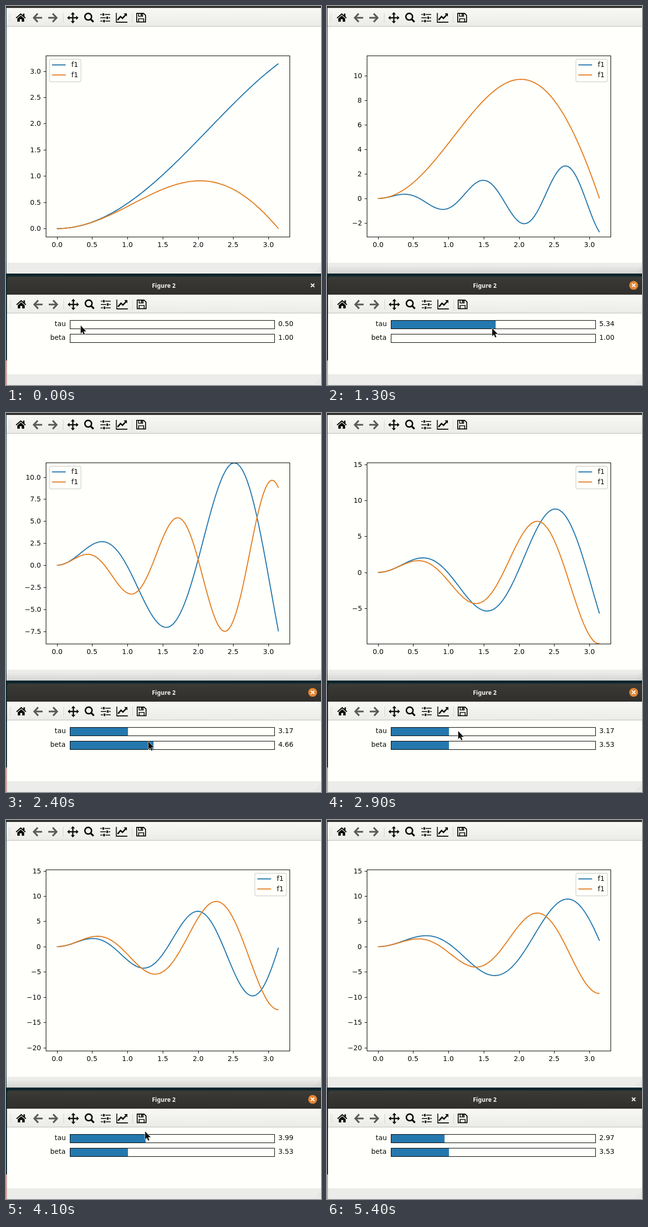
An HTML page with a canvas that plays this animation: 641 by 772 pixels, repeating every 5.6 s.

```html
<!DOCTYPE html>
<html lang="en">
<head>
<meta charset="utf-8">
<title>Figure 2</title>
<style>
  html, body { margin: 0; width: 100%; height: 100%; overflow: hidden; background: #06262e; }
  canvas { display: block; }
</style>
</head>
<body>
<canvas id="stage" width="641" height="772"></canvas>
<script>
const ctx = document.getElementById('stage').getContext('2d');
const LOOP = 5600, STEP = 100;
const PAPER = '#fffffb', BLUE = '#2478ae', ORANGE = '#e47e20', INK = '#0b0b0b', GREY = '#5a5a57';
const FONT = '13.89px "DejaVu Sans", sans-serif';
const AXES = { left: 81, bottom: 470.2, width: 496, height: 369.6 };
const BAR = { left: 130.5, width: 416 };
const SAMPLES = 100;

// Key points [time, ...values], linear in between. The sliders' values are bar lengths in px.
const tauKeys = [[400, 0], [700, 130], [800, 142], [1100, 259], [1700, 117], [3100, 117], [3600, 267], [4300, 108]];
const betaKeys = [[1900, 0], [2600, 237], [2800, 117]];
const cursorKeys = [[0, 152, 651], [200, 148, 649], [400, 148, 649], [800, 241, 647], [1100, 389, 646],
  [1800, 204, 683], [2000, 135, 674], [2600, 367, 667], [2900, 267, 648], [3100, 247, 644],
  [3600, 396, 623], [4300, 238, 639], [4600, 204, 411], [4900, 83, 9]];
const PAUSES = [100, 1200, 2500];

function sample(keys, t) {
  const i = keys.findIndex(key => key[0] > t);
  if (i === 0) return keys[0].slice(1);
  if (i < 0) return keys.at(-1).slice(1);
  const a = keys[i - 1], b = keys[i], u = (t - a[0]) / (b[0] - a[0]);
  return a.slice(1).map((v, k) => v + (b[k + 1] - v) * u);
}

const xs = Array.from({ length: SAMPLES }, (_, i) => Math.PI * i / (SAMPLES - 1));

// The y limits only ever grow, so each state is built on the one before it.
function buildStates() {
  let low = -0.05 * Math.PI, high = 1.05 * Math.PI;
  return Array.from({ length: LOOP / STEP }, (_, i) => {
    const t = PAUSES.includes(i * STEP) ? (i - 1) * STEP : i * STEP;
    const tauBar = Math.round(sample(tauKeys, t)[0]);
    const betaBar = Math.round(sample(betaKeys, t)[0]);
    const tau = 0.5 + 9.5 * tauBar / BAR.width;
    const beta = 1 + 9 * betaBar / BAR.width;
    const curves = [xs.map(x => beta * x * Math.sin(tau * x)), xs.map(x => tau * x * Math.sin(beta * x))];
    low = Math.min(low, ...curves.flat());
    high = Math.max(high, ...curves.flat());
    return { t, tau, beta, tauBar, betaBar, curves, low, high };
  });
}
const states = buildStates();

function rect(x, y, w, h, fill) {
  ctx.fillStyle = fill;
  ctx.fillRect(x, y, w, h);
}

function frame(x, y, w, h) {
  ctx.strokeStyle = '#000';
  ctx.lineWidth = 1.1;
  ctx.strokeRect(x, y, w, h);
}

function shade(y, h, from, to) {
  const g = ctx.createLinearGradient(0, y, 0, y + h);
  g.addColorStop(0, from);
  g.addColorStop(1, to);
  return g;
}

function line(points, color, width) {
  ctx.beginPath();
  points.forEach(p => ctx.lineTo(...p));
  ctx.strokeStyle = color;
  ctx.lineWidth = width;
  ctx.stroke();
}

function polygon(points, color) {
  ctx.beginPath();
  points.forEach(p => ctx.lineTo(...p));
  ctx.fillStyle = color;
  ctx.fill();
}

// Text starts on whole pixels; anchor is 0 for left, 0.5 for centre, 1 for right.
function text(str, x, y, anchor = 0, font = FONT, color = INK) {
  ctx.font = font;
  ctx.fillStyle = color;
  ctx.fillText(str, Math.round(x - anchor * ctx.measureText(str).width), Math.round(y));
}

function grip(bottom) {
  for (let row = 0; row < 4; row++)
    for (let col = row; col < 4; col++) rect(629 + col * 3, bottom - row * 3, 1, 1, '#bdbdb8');
}

function drawToolbar(dx, dy) {
  ctx.save();
  ctx.translate(dx, dy);
  rect(1, 4, 641, 37, shade(4, 37, '#f8f8f5', '#ebebe7'));
  rect(1, 41, 641, 1, '#b9b9b5');
  for (let i = 0; i < 12; i++) rect(6 + i % 2 * 3, 15 + (i >> 1) * 3, 1, 1, '#bdbdb8');
  for (const x of [116, 256]) rect(x, 14, 1, 20, '#d2d2ce');

  // home
  line([[20.5, 24.5], [30, 16.3], [39.5, 24.5]], INK, 2.2);
  rect(34.5, 15.5, 3, 6, INK);
  polygon([[23, 32], [23, 25.5], [30, 19.5], [37, 25.5], [37, 32]], INK);
  rect(28, 27, 4, 5, '#efefec');

  // back and forward
  for (const [tip, dir] of [[55.5, 1], [104, -1]]) {
    line([[tip + dir, 24], [tip + 18 * dir, 24]], GREY, 3.4);
    line([[tip + 9 * dir, 15.5], [tip + dir, 24], [tip + 9 * dir, 32.5]], GREY, 3.4);
  }

  // pan
  ctx.save();
  ctx.translate(136, 24);
  for (let i = 0; i < 4; i++) {
    line([[0, 0], [0, -8]], INK, 2.6);
    polygon([[0, -11.5], [4.2, -6.8], [-4.2, -6.8]], INK);
    ctx.rotate(Math.PI / 2);
  }
  ctx.restore();

  // zoom
  ctx.beginPath();
  ctx.arc(167.3, 21.8, 6.8, 0, 7);
  ctx.strokeStyle = INK;
  ctx.lineWidth = 3;
  ctx.stroke();
  line([[172, 26.5], [178, 32.5]], INK, 3.8);

  // settings
  [198, 206, 199.5].forEach((knob, i) => {
    const y = 17.3 + i * 6.7;
    line([[192, y], [212, y]], INK, 1.7);
    rect(knob - 2.9, y - 2, 5.8, 4, '#f1f1ee');
    rect(knob - 1.7, y - 2.5, 3.4, 5, INK);
  });

  // chart
  line([[224.5, 14], [224.5, 33], [247, 33]], INK, 1.8);
  line([[227, 28.5], [233, 21.5], [237, 25], [244, 17.5]], INK, 2.8);
  polygon([[239.5, 15], [246, 15], [246, 21.5]], INK);

  // save
  line([[266, 15], [280, 15], [284, 19], [284, 32.5], [266, 32.5], [266, 14]], INK, 1.9);
  line([[269.8, 32], [269.8, 26], [280.2, 26], [280.2, 32]], INK, 1.7);
  line([[269.8, 15], [269.8, 21], [278, 21], [278, 15]], INK, 1.7);
  rect(274, 16, 2.5, 4, INK);
  ctx.restore();
}

function drawWindows(focused) {
  rect(0, 0, 641, 772, '#06262e');
  rect(0, 722, 2, 50, '#d3a297');
  rect(1, 0, 640, 4, '#32312e');
  drawToolbar(0, 0);
  rect(1, 42, 640, 481, PAPER);
  rect(1, 523, 640, 22, '#ececea');
  grip(541);
  rect(0, 545, 641, 6, shade(545, 6, '#04202a', '#0d2a30'));
  if (focused) rect(0, 528, 641, 17, shade(528, 17, 'rgba(0,0,0,0)', 'rgba(0,0,0,0.1)'));

  ctx.beginPath();
  ctx.roundRect(2, 551, 641, 40, [5, 0, 0, 0]);
  ctx.fillStyle = shade(551, 37, '#3b3a36', '#302f2c');
  ctx.fill();
  text('Figure 2', 321.5, 574, 0.5, '600 12px "Noto Sans", "Open Sans", sans-serif', '#f8f8f4');
  if (focused) {
    ctx.beginPath();
    ctx.arc(624, 569, 9.1, 0, 7);
    ctx.fillStyle = '#e28533';
    ctx.fill();
  }
  for (const d of [3.5, -3.5]) line([[624 - d, 565.5], [624 + d, 572.5]], '#fff', 2);

  drawToolbar(1, 584);
  rect(2, 626, 639, 124, PAPER);
  rect(2, 750, 639, 22, '#ececea');
  grip(768);
}

function tickStep(range) {
  const raw = range / 9, power = 10 ** Math.floor(Math.log10(raw));
  return [1, 2, 2.5, 5, 10].find(s => s * power >= raw) * power;
}

function drawPlot({ curves, low, high }) {
  const { left, bottom, width, height } = AXES;
  const snap = v => Math.round(v) + 0.5;
  const px = x => left + width / 22 + x / Math.PI * width / 1.1;
  const py = y => bottom - (y - low) / (high - low) * height;
  const paths = curves.map(ys => ys.map((y, i) => [px(xs[i]), py(y)]));
  const colors = [BLUE, ORANGE];
  const box = [snap(left), snap(bottom - height), width, Math.floor(height)];

  ctx.save();
  ctx.beginPath();
  ctx.rect(...box);
  ctx.clip();
  paths.forEach((path, i) => line(path, colors[i], 2.08));
  ctx.restore();
  frame(...box);

  for (let x = 0; x <= 3; x += 0.5) {
    const at = snap(px(x));
    line([[at, 470.5], [at, 475.5]], '#000', 1.1);
    text(x.toFixed(1), px(x), 491, 0.5);
  }
  const step = tickStep(high - low), digits = Number.isInteger(step) ? 0 : 1;
  for (let k = Math.ceil(low / step); k * step <= high; k++) {
    const y = k * step, at = snap(py(y));
    line([[76.5, at], [81.5, at]], '#000', 1.1);
    text(y.toFixed(digits).replace('-', '\u2212'), 71.3, py(y) + 5, 1);
  }

  // The legend prefers the right corner and moves left when a curve is in its way.
  const blocked = paths.flat().some(([x, y]) => x > 506 && x < 571 && y > 108 && y < 155);
  const lx = blocked ? 88 : 506;
  ctx.beginPath();
  ctx.roundRect(lx + 0.5, 108.5, 64, 46, 3);
  ctx.fillStyle = PAPER;
  ctx.fill();
  ctx.strokeStyle = '#d3d3d0';
  ctx.lineWidth = 1.3;
  ctx.stroke();
  colors.forEach((color, i) => {
    const y = 120 + i * 20.5;
    line([[lx + 5.5, y], [lx + 33.5, y]], color, 2.08);
    text('f1', lx + 45, y + 4.2);
  });
}

function drawSlider(label, value, length, y) {
  if (length) rect(BAR.left, y, length + 0.7, 17, BLUE);
  frame(BAR.left, y, BAR.width, 17);
  text(label, 121.7, y + 11.5, 1);
  text(value.toFixed(2), 554.3, y + 11.5);
}

function drawCursor(x, y) {
  ctx.save();
  ctx.translate(x, y);
  const arrow = [[0, 0], [0, 16], [3.5, 12.7], [6.2, 18.5], [8.5, 17.5], [6, 11.8], [11, 11.5], [0, 0]];
  ctx.lineJoin = 'round';
  line(arrow, '#e4e4e0', 1.6);
  polygon(arrow, '#111');
  ctx.restore();
}

function draw(state) {
  const { t } = state;
  drawWindows(t >= 400 && t < 5400);
  drawPlot(state);
  drawSlider('tau', state.tau, state.tauBar, 640.5);
  drawSlider('beta', state.beta, state.betaBar, 668.5);
  if (t === 4600) text('x=0.260955     y=6.54432', 3, 539, 0, '13px "DejaVu Sans", sans-serif');
  if (t < 5000) drawCursor(...sample(cursorKeys, t));
}

let shown = -1;
function tick() {
  const index = Math.floor(performance.now() % LOOP / STEP);
  if (index !== shown) draw(states[shown = index]);
  requestAnimationFrame(tick);
}
tick();
</script>
</body>
</html>
```
